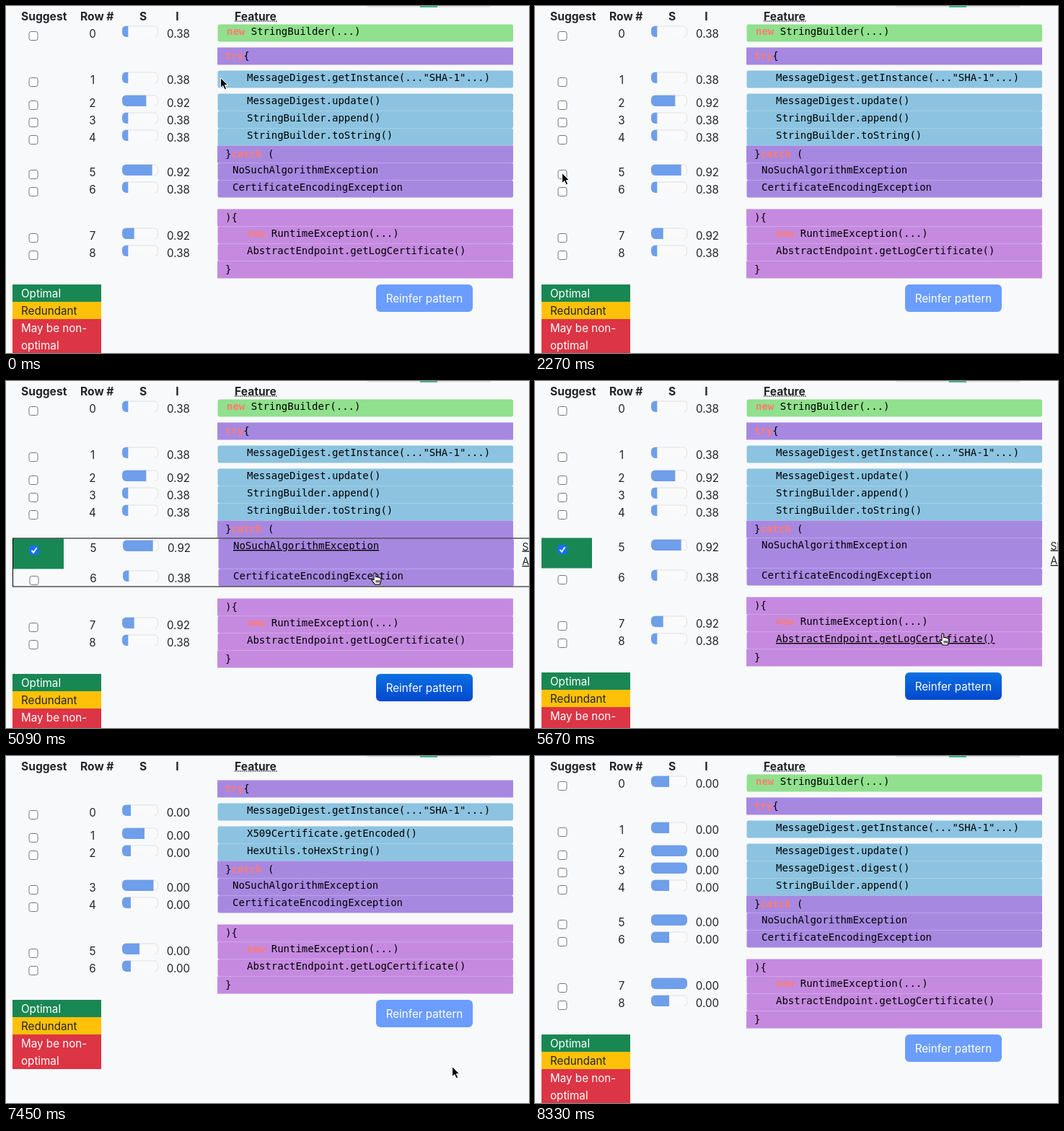
An HTML page that plays this animation: 725 px wide and 481 px high, repeating every 8470 ms.

```html
<!DOCTYPE html>
<html lang="en">
<head>
<meta charset="utf-8">
<title>Pattern feature table</title>
<style>
html, body { margin: 0; width: 100%; height: 100%; overflow: hidden; background: #f8f9fa; }
svg { display: block; width: 725px; height: 481px; }
text { font: 15.2px Inter, Roboto, sans-serif; fill: #212529; }
.head { font-size: 15.6px; font-weight: 700; }
.code { font: 14px "DejaVu Sans Mono", monospace; fill: #000; }
.key { font-weight: 700; fill: #ff7b72; }
.mid { text-anchor: middle; }
.light { fill: #fff; }
.link { font-size: 14px; text-decoration: underline; }
.scene { display: none; }
.scene.on { display: inline; }
</style>
</head>
<body>
<svg id="stage" viewBox="0 0 725 481">
  <defs>
    <clipPath id="pill"><rect width="50" height="15.5" rx="6"/></clipPath>
    <linearGradient id="ready" x2="0" y2="1">
      <stop stop-color="#0d70e2"/><stop offset="1" stop-color="#0048cf"/>
    </linearGradient>
    <linearGradient id="hovered" x2="0" y2="1">
      <stop stop-color="#0b69dc"/><stop offset="1" stop-color="#0047c8"/>
    </linearGradient>
  </defs>
  <rect width="725" height="481" fill="#f8f9fa"/>
  <rect x="501" width="171" height="1.5" fill="#dcdedf"/>
  <rect x="574" width="24" height="2" fill="#43b58c"/>
  <text class="head" x="21" y="19.6">Suggest</text>
  <text class="head" x="103" y="19.6">Row #</text>
  <text class="head mid" x="190" y="19.6">S</text>
  <text class="head mid" x="237.5" y="19.6">I</text>
  <text class="head" x="317" y="19.6">Feature</text>
  <path d="M317 21H376" stroke="#212529" stroke-width="1.3" stroke-dasharray="1.3 1.3"/>
  <g id="scenes"></g>
  <g id="pointer">
    <path id="arrow" d="M.5 .5V14.5L3.8 11.5L6.1 16.8L8.6 15.7L6.3 10.6H10.6Z"
      fill="#000" stroke="#fff" stroke-width="1"/>
    <path id="hand" d="M4 9.5V2.2Q5.3-.2 6.6 2.2V6.7Q8.2 5.6 9 7Q10.7 6.2 11.4 7.8Q13.6 7.2 13.7 9.5V12.5L12.2 17H5.5L1 11.2Q.6 8.7 4 10.8ZM7.2 11V14.5M9.3 11V14.5M11.3 11V14.5"
      fill="#fff" stroke="#000" stroke-width="1.1" stroke-linejoin="round"/>
  </g>
</svg>
<script>
const LOOP = 8470, START = 510, STEP = 147.5;

// fill, text x, left edge; kinds without a checkbox are brace lines
const KINDS = {
  make:  { fill: "#90e08d", x: 306, row: true },
  open:  { fill: "#a788e1", x: 304 },
  call:  { fill: "#8cc3e0", x: 334, row: true },
  error: { fill: "#a788e1", x: 314, row: true },
  brace: { fill: "#c58ae0", x: 304 },
  raise: { fill: "#c58ae0", x: 334, row: true }
};

// kind, text, score, importance, gap above
const tail = (scores, values) => [
  ["open", "}catch ("],
  ["error", "NoSuchAlgorithmException", scores[0], values[0]],
  ["error", "CertificateEncodingException", scores[1], values[1]],
  ["brace", "){", 0, 0, 16],
  ["raise", "new RuntimeException(...)", scores[2], values[2]],
  ["raise", "AbstractEndpoint.getLogCertificate()", scores[3], values[3]],
  ["brace", "}"]
];
const digest = 'MessageDigest.getInstance(..."SHA-1"...)';
const LOW = 0.38, HIGH = 0.92;

const first = [
  ["make", "new StringBuilder(...)", 1 / 6, LOW],
  ["open", "try{", 0, 0, 8],
  ["call", digest, 1 / 6, LOW, 8],
  ["call", "MessageDigest.update()", 4 / 6, HIGH, 8],
  ["call", "StringBuilder.append()", 1 / 6, LOW],
  ["call", "StringBuilder.toString()", 1 / 6, LOW],
  ...tail([5 / 6, 1 / 6, 2 / 6, 1 / 6], [HIGH, LOW, HIGH, LOW])
];
const second = [
  ["open", "try{", 0, 0, 8],
  ["call", digest, 0.24, 0, 8],
  ["call", "X509Certificate.getEncoded()", 0.62, 0, 8],
  ["call", "HexUtils.toHexString()", 0.24, 0],
  ...tail([0.87, 0.24, 0.48, 0.24], [0, 0, 0, 0])
];
const third = [
  ["make", "new StringBuilder(...)", 0.5, 0],
  ["open", "try{", 0, 0, 8],
  ["call", digest, 0.5, 0, 8],
  ["call", "MessageDigest.update()", 1, 0, 8],
  ["call", "MessageDigest.digest()", 1, 0],
  ["call", "StringBuilder.append()", 0.5, 0],
  ...tail([1, 0.5, 1, 0.5], [0, 0, 0, 0])
];

const rect = (x, y, w, h, fill, more = "") =>
  `<rect x="${x}" y="${y}" width="${w}" height="${h}" fill="${fill}" ${more}/>`;
const label = (x, y, text, cls = "") => `<text class="${cls}" x="${x}" y="${y}">${text}</text>`;

function checkbox(y, checked) {
  if (!checked) return rect(32, y + 10.5, 12, 12, "#fff", 'rx="2.5" stroke="#767676"');
  return rect(31.5, y + 10, 13, 13, "#1670f5", 'rx="2.5"') +
    `<path d="M34.5 ${y + 16.8}l2.6 3 4.4-6.6" fill="none" stroke="#fff" stroke-width="1.9"/>`;
}

const bar = (y, score) => `<g transform="translate(161 ${y + 2.5})">
  <path d="M0 6Q0 .5 6 .5H44Q49.5 .5 49.5 6V10Q49.5 15 45 15" fill="#fafafb" stroke="#dfe1e3"/>
  <g clip-path="url(#pill)">${rect(0, 0, 50 * score, 15.5, "#6f9eea")}</g></g>`;

function codeLine(kind, y, text) {
  const code = text.replace(/new|try|catch/, word => `<tspan class="key">${word}</tspan>`);
  return label(kind.x, y + (kind.row ? 15 : 17), code, "code");
}

function footer(y, active) {
  return rect(9, y, 123, 24, "#198754") + label(21, y + 17.5, "Optimal", "light") +
    rect(9, y + 24, 123, 24, "#ffc107") + label(21, y + 41.5, "Redundant") +
    rect(9, y + 48, 123, 48, "#dc3545") + label(21, y + 65.5, "May be non-", "light") +
    label(21, y + 89.5, "optimal", "light") +
    rect(513, y, 134, 38, active ? "url(#ready)" : "#6b9dff", `rx="6" ${active ? 'class="button"' : ""}`) +
    label(580, y + 24.5, "Reinfer pattern", "mid light");
}

function scene(rows, checked = false, outlined = false) {
  let y = 25, index = 0, out = "";
  for (const [name, text, score, value, gap = 0] of rows) {
    const kind = KINDS[name];
    const chosen = checked && text.startsWith("NoSuch");
    const height = chosen ? 42 : 24;
    const nudge = outlined && name === "error" ? 1 : 0;
    y += gap;
    let part = rect(kind.row ? 293.5 : 293, y + 0.5, kind.row ? 409.5 : 410, height, kind.fill, kind.row ? 'rx="2.5"' : "");
    if (kind.row) {
      if (chosen) {
        part += rect(9 - nudge, y + 0.5, 70 + nudge, 42, "#198754") +
          label(714.5, y + 16.5, "Show", "link") + label(714.5, y + 37, "All", "link");
      }
      part += checkbox(y, chosen) + label(120, y + 18.5, index++, "mid") +
        bar(y, score) + label(239, y + 18.5, value.toFixed(2), "mid");
    }
    part += codeLine(kind, y, text);
    out += nudge ? `<g transform="translate(1 1)">${part}</g>` : part;
    y += height;
    if (outlined && text.startsWith("Cert")) {
      out += rect(9.5, 218, 730, 67, "none", 'stroke="#000"');
      y += 2;
    }
  }
  return `<g class="scene">${out}${footer(y + 9, checked)}</g>`;
}

const holder = document.getElementById("scenes");
holder.innerHTML = scene(first) + scene(first, true, true) + scene(first, true) + scene(second) + scene(third);
const scenes = [...holder.children];
const buttons = holder.querySelectorAll(".button");
const texts = (n, start) => [...scenes[n].querySelectorAll(".code")].find(e => e.textContent.startsWith(start));
const errorLink = texts(1, "NoSuch"), endpointLink = texts(2, "Abstract");
const pointer = document.getElementById("pointer");
const arrow = document.getElementById("arrow"), hand = document.getElementById("hand");

// first step, scene
const CUTS = [[-9, 0], [18, 1], [32, 2], [42, 0], [47, 3], [52, 4]];
// step, x, y
const PATH = [
  [-1, 297, 99], [3, 165, 168], [7, 41, 235], [10, 37, 231], [17, 37, 231],
  [18, 33, 232], [20, 33, 232], [25, 318, 227], [28, 408, 246], [29, 408, 246],
  [31, 506, 265], [33, 545, 325], [34, 545, 325], [38, 604, 420], [41, 604, 420],
  [42, 606, 421], [46, 606, 421], [49, 643, 447], [52, 668, 492]
];

function place(step) {
  const next = PATH.findIndex(p => p[0] >= step);
  if (next < 0) return PATH[PATH.length - 1].slice(1);
  if (next === 0) return PATH[0].slice(1);
  const a = PATH[next - 1], b = PATH[next], f = (step - a[0]) / (b[0] - a[0]);
  return [1, 2].map(i => Math.round(a[i] + (b[i] - a[i]) * f));
}

const show = (element, on) => element.setAttribute("visibility", on ? "visible" : "hidden");
const underline = (element, on) => { element.style.textDecoration = on ? "underline" : "none"; };
let last = null;

function draw() {
  const time = performance.now() % LOOP;
  const step = Math.floor((time - START) / STEP + 0.1);
  if (step !== last) {
    last = step;
    const current = CUTS.filter(c => c[0] <= step).pop()[1];
    scenes.forEach((g, i) => g.classList.toggle("on", i === current));
    pointer.setAttribute("transform", `translate(${place(step)})`);
    const pointing = step >= 18 && step < 42;
    show(arrow, !pointing);
    show(hand, pointing);
    underline(errorLink, step >= 25 && step <= 31);
    underline(endpointLink, step === 35);
    buttons[1].setAttribute("fill", step >= 37 ? "url(#hovered)" : "url(#ready)");
  }
  requestAnimationFrame(draw);
}
draw();
</script>
</body>
</html>
```
